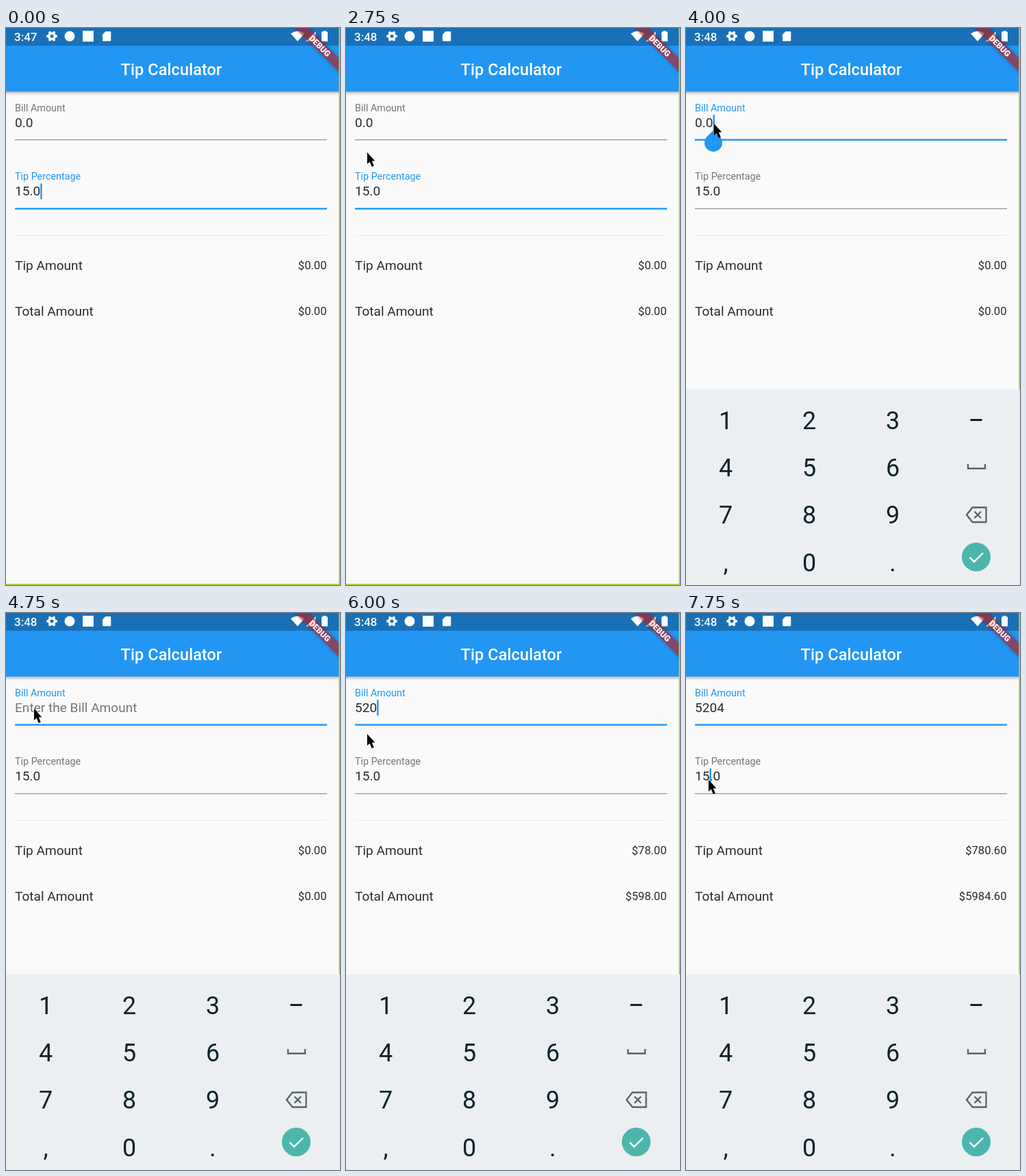
These frames come from a looping animation (488x815 px, 8 s). An HTML page:

```html
<!DOCTYPE html>
<html lang="en">
<head>
<meta charset="utf-8">
<title>Tip Calculator</title>
<style>
  html, body { margin: 0; width: 488px; height: 815px; overflow: hidden; background: #fafafa; }
  svg { display: block; font: 19.1px Roboto, sans-serif; fill: #2b2b2b; }
  .label { font-size: 14.35px; }
  .money { font-size: 16.6px; text-anchor: end; }
  .key { font-size: 36px; text-anchor: middle; fill: #0a222c; }
  .icon { fill: none; stroke: #56636b; stroke-width: 2.3; }
</style>
</head>
<body>
<svg width="488" height="815" viewBox="0 0 488 815">
  <defs>
    <filter id="barShadow" x="-5%" y="-10%" width="110%" height="140%">
      <feDropShadow dx="0" dy="2" stdDeviation="2" flood-opacity=".32"/>
    </filter>
    <filter id="ribbonShadow" x="-10%" y="-80%" width="120%" height="260%">
      <feDropShadow dx="0" dy="0" stdDeviation="2.5" flood-opacity=".45"/>
    </filter>
  </defs>
  <rect width="488" height="815" fill="#fafafa"/>

  <!-- App bar and status bar -->
  <rect x="-10" width="508" height="93" fill="#2196f3" filter="url(#barShadow)"/>
  <rect width="488" height="26" fill="#1a70b6"/>
  <text x="241.5" y="69" font-size="23.7" font-weight="500" text-anchor="middle" fill="#fff">Tip Calculator</text>
  <g fill="#fff">
    <text id="clock" x="12" y="18.5" font-size="17" font-weight="500"></text>
    <g fill="none" stroke="#fff" transform="translate(67 12)">
      <circle r="4.3" stroke-width="3.4"/>
      <circle r="6.5" stroke-width="2.6" pathLength="12" stroke-dasharray="1" stroke-dashoffset=".5"/>
    </g>
    <circle cx="93" cy="12" r="7.5"/>
    <rect x="112" y="4" width="16" height="16"/>
    <path d="M145.500 5H152q1.300 0 1.300 1.300V18q0 1.300-1.300 1.300H142.300q-1.300 0-1.300-1.300V9.500Z"/>
    <path d="M416 8.200Q426 1 436 8.200L426 19.500Z"/>
    <path d="M438 19.500L452.500 5V19.500Z"/>
    <path d="M463.500 5.500V4H467.500V5.500H470V19.500H461V5.500Z"/>
  </g>
  <g transform="translate(487 -2) rotate(45)">
    <rect x="-60" y="33" width="120" height="14.300" fill="#b71c1c" opacity=".63" filter="url(#ribbonShadow)"/>
    <text y="44.300" font-size="12" font-weight="900" text-anchor="middle" fill="#fff">DEBUG</text>
  </g>

  <!-- Form -->
  <text id="billLabel" class="label" x="13" y="121.500">Bill Amount</text>
  <text id="bill" x="13" y="145"></text>
  <rect id="billLine" x="13" width="456"/>
  <text id="tipLabel" class="label" x="13" y="221.500">Tip Percentage</text>
  <text id="tip" x="13" y="245">15.0</text>
  <rect id="tipLine" x="13" width="456"/>
  <rect x="13" y="303" width="456" height="1" fill="#e9e9e9"/>
  <text x="13" y="353.500">Tip Amount</text>
  <text id="tipSum" class="money" x="468.500" y="353"></text>
  <text x="13" y="420.500">Total Amount</text>
  <text id="totalSum" class="money" x="468.500" y="420"></text>
  <rect id="caret" width="2.400" height="23" fill="#2196f3"/>
  <path id="handle" d="M40 149.500L49.200 158.700A13 13 0 1 1 30.800 158.700Z" fill="#2196f3"/>
  <path d="M487.200 0V814.200H0" fill="none" stroke="#b5d338" stroke-width="1.700"/>

  <g id="keyboard">
    <rect y="529" width="488" height="286" fill="#ebeff2"/>
    <g id="keys"></g>
    <rect x="415.500" y="572" width="17" height="3" fill="#0a222c"/>
    <path class="icon" d="M412 638V644.500H437V638"/>
    <path class="icon" d="M418.500 701.500H438.500V723H418.500L410 712.200ZM421.500 707.500L431 717M431 707.500L421.500 717"/>
    <circle cx="424" cy="774" r="21" fill="#4db6ac"/>
    <path d="M414.500 774.500L421 781L434 768" fill="none" stroke="#fff" stroke-width="2.400"/>
  </g>
  <path id="mouse" d="M0 0V17L3.700 13.700L6.700 21L9.800 19.700L6.800 12.500H11.300Z" fill="#000"/>
</svg>
<script>
const $ = id => document.getElementById(id);
const BLUE = '#2196f3', LOOP = 8000, STEP = 250;

// [time, value] lists; the last entry reached applies
const bills = [[0, '0.0'], [4250, '0.'], [4500, ''], [5250, '5'], [5500, '52'], [5750, '520'], [6250, '5204']];
const carets = [[3750, true], [4750, false], [5250, true], [6750, false], [7250, true], [7500, false], [7750, true]];
const mousePath = [[1500, 0, 264], [1750, 10, 266], [3250, 41, 140], [5250, 41, 140],
  [6000, 31, 177], [6500, 31, 177], [7250, 33, 244], [8000, 33, 244]];

const current = (list, t) => list.filter(([at]) => at <= t).pop()[1];

function mouseAt(t) {
  const i = mousePath.findIndex(([at]) => at > t);
  const [t0, x0, y0] = mousePath[i - 1], [t1, x1, y1] = mousePath[i];
  const k = (t - t0) / (t1 - t0);
  return [x0 + (x1 - x0) * k, y0 + (y1 - y0) * k].map(Math.round);
}

function show(id, visible) {
  $(id).style.display = visible ? '' : 'none';
}

function setFocus(field, y, focused) {
  $(field + 'Label').setAttribute('fill', focused ? BLUE : '#757575');
  const line = $(field + 'Line'), height = focused ? 2.4 : 1.2;
  line.setAttribute('y', y - height / 2);
  line.setAttribute('height', height);
  line.setAttribute('fill', focused ? BLUE : '#8d8d8d');
}

function render(t) {
  const typing = t >= 3750;
  const bill = current(bills, t);
  const tip = Number(bill) * 0.15;

  $('clock').textContent = t < 1500 ? '3:47' : '3:48';
  $('bill').textContent = bill || 'Enter the Bill Amount';
  $('bill').setAttribute('fill', bill ? '#2b2b2b' : '#757575');
  $('tipSum').textContent = '$' + tip.toFixed(2);
  $('totalSum').textContent = '$' + (Number(bill) + tip).toFixed(2);
  setFocus('bill', 163.6, typing);
  setFocus('tip', 264.4, !typing);

  const inTip = !typing || t >= 7750;
  const before = inTip ? $('tip').getSubStringLength(0, typing ? 2 : 4)
    : bill && $('bill').getComputedTextLength();
  $('caret').setAttribute('x', 13 + Number(before));
  $('caret').setAttribute('y', inTip ? 227.5 : 127);
  show('caret', typing ? current(carets, t) : t % 1000 < 500);

  show('handle', typing && t < 4250);
  show('keyboard', typing);
  $('keyboard').setAttribute('transform', `translate(0 ${t < 4000 ? 143 : 0})`);

  show('mouse', t >= 1500);
  if (t >= 1500) $('mouse').setAttribute('transform', `translate(${mouseAt(t)})`);
}

$('keys').innerHTML = [...'123456789,0.'].map((key, i) =>
  `<text class="key" x="${58 + i % 3 * 122}" y="${587 + Math.floor(i / 3) * 69.2}">${key}</text>`).join('');

function tick() {
  const t = performance.now() % LOOP;
  render(Math.floor(t / STEP) * STEP);
  requestAnimationFrame(tick);
}
tick();
</script>
</body>
</html>
```
